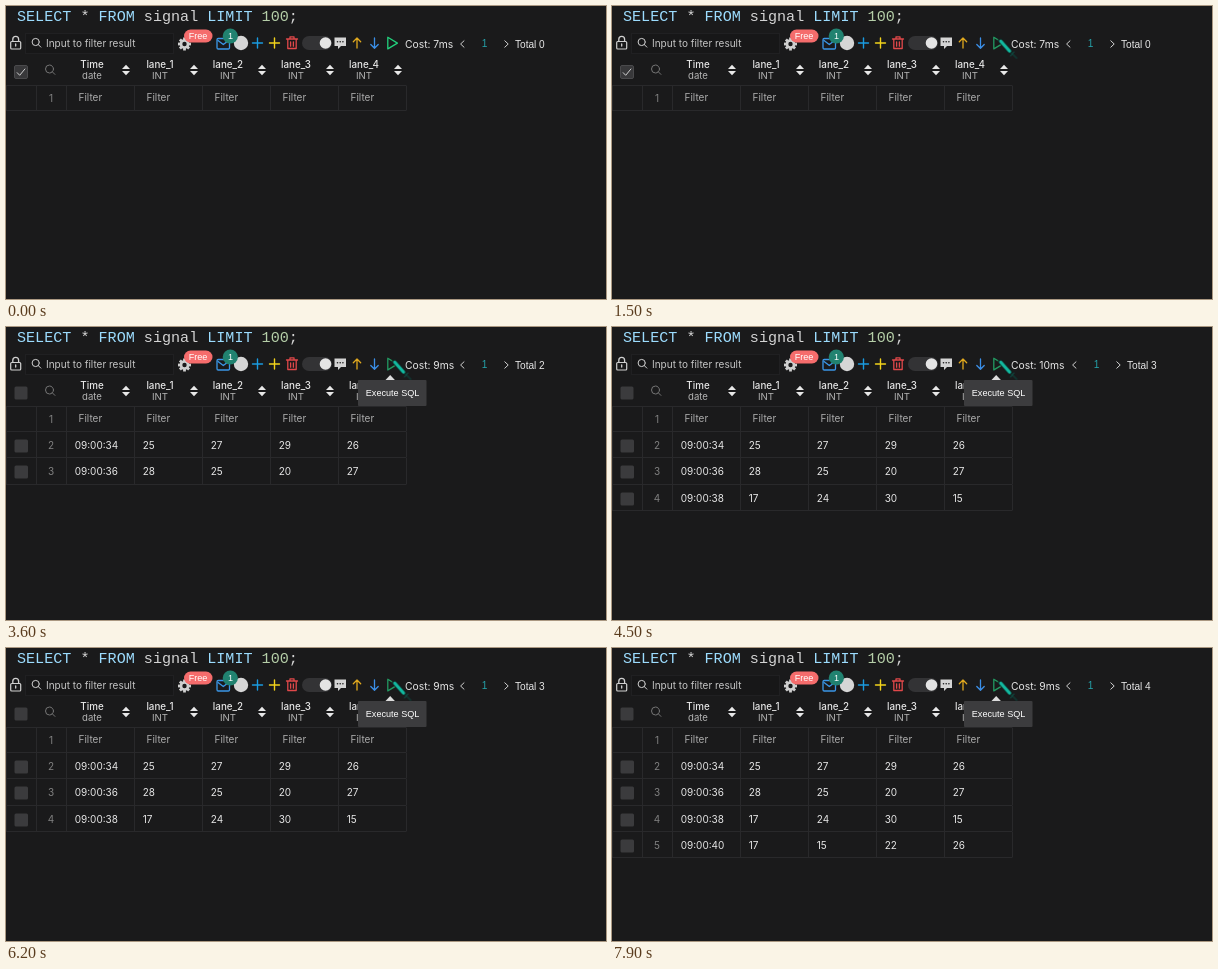
Animation, 600 px wide and 293 px high, one loop 8000 ms. Source, as an HTML page:

```html
<!DOCTYPE html>
<html lang="en">
<head>
<meta charset="utf-8">
<title>Query result</title>
<style>
html, body { margin: 0; width: 100%; height: 100%; overflow: hidden; background: #1a1a1b; }
svg { display: block; width: 100vw; height: 100vh; }
text { font: 10px Inter, "Open Sans", sans-serif; fill: #e6e6e6; white-space: pre; }
.sql { font: 15.1px "Liberation Mono", monospace; fill: #d4d4d4; }
.kw { fill: #9cdcfe; }
.num { fill: #b5cea8; }
.head { font-weight: 500; font-size: 9.8px; text-anchor: middle; }
.type { font-size: 9.6px; fill: #b4b4b4; text-anchor: middle; }
.dim { fill: #acacac; }
.hint { fill: #c6c6c6; }
.cost { font-size: 10.3px; }
.idx { fill: #808080; text-anchor: middle; }
.helv { font: 10.1px "Liberation Sans", Arial, sans-serif; }
.page { fill: #25a0a8; }
.tiny { font: 9.1px "Liberation Sans", Arial, sans-serif; fill: #fff; }
.line { fill: none; stroke-width: 1.3; stroke-linecap: round; stroke-linejoin: round; }
.thin { stroke-width: 1; }
.grid { fill: none; stroke: #29292b; stroke-width: 1; }
#pointer { animation: move 8s infinite; }
@keyframes move {
  0% { transform: translate(640px, 100px); animation-timing-function: step-end; }
  7.5% { transform: translate(584px, 80px); animation-timing-function: steps(2); }
  10% { transform: translate(474px, 43px); animation-timing-function: steps(2); }
  12.5% { transform: translate(411.5px, 24px); animation-timing-function: steps(4); }
  17.5%, 100% { transform: translate(386.5px, 31px); }
}
</style>
</head>
<body>
<svg id="stage" viewBox="0 0 600 293" preserveAspectRatio="none"></svg>
<script>
const LOOP = 8000;
const HOVER = 1400;
const TIP = 1600;
const RUNS = [0, 2500, 4100, 5800, 6800, LOOP];
const COLS = [128, 196, 264, 332];
const ROWS = [
  ['09:00:34', 25, 27, 29, 26],
  ['09:00:36', 28, 25, 20, 27],
  ['09:00:38', 17, 24, 30, 15],
  ['09:00:40', 17, 15, 22, 26]
];
const STATS = [['7ms', 0], ['9ms', 2], ['10ms', 3], ['9ms', 3], ['9ms', 4]];
let rules = '';
let count = 0;

const text = (x, y, s, cls = '') => `<text x="${x}" y="${y}" class="${cls}">${s}</text>`;
const path = (d, color, cls = '', width) =>
  `<path class="line ${cls}" d="${d}" stroke="${color}" ${width ? `style="stroke-width:${width}"` : ''}/>`;
const rect = (x, y, w, h, fill, more = '') =>
  `<rect x="${x}" y="${y}" width="${w}" height="${h}" fill="${fill}" ${more}/>`;
const dot = (x, y, r, fill) => `<circle cx="${x}" cy="${y}" r="${r}" fill="${fill}"/>`;

// Shows a group only between two times of the loop.
function during(from, to, body) {
  const name = 'show' + count++;
  const stop = (t, v) => `${t / LOOP * 100}% { visibility: ${v} }`;
  rules += `@keyframes ${name} { ${from ? stop(0, 'hidden') : ''} ${stop(from, 'visible')} ` +
    `${stop(to, to < LOOP ? 'hidden' : 'visible')} }`;
  return `<g style="animation: ${name} 8s step-end infinite">${body}</g>`;
}

const search = (x, y, r, color) =>
  path(`M${x + r} ${y}a${r} ${r} 0 1 0 ${-2 * r} 0a${r} ${r} 0 1 0 ${2 * r} 0` +
    `M${x + r * .7} ${y + r * .7}l2.6 2.6`, color, 'thin');

function editor() {
  return `<text x="11" y="15.3" class="sql"><tspan class="kw">SELECT</tspan> * <tspan class="kw">FROM</tspan>` +
    ` signal <tspan class="kw">LIMIT</tspan> <tspan class="num">100</tspan>;</text>`;
}

function gear(x, y) {
  let teeth = '';
  for (let a = 0; a < 360; a += 45)
    teeth += rect(x - 1.4, y - 6.5, 2.8, 3, '#cfcfcf', `transform="rotate(${a} ${x} ${y})"`);
  return teeth + `<circle cx="${x}" cy="${y}" r="3.5" fill="none" stroke="#cfcfcf" stroke-width="2.6"/>`;
}

function toolbar() {
  const plus = (x, c) => path(`M${x - 5} 37h10M${x} 32v10`, c, '', 1.4);
  const play = color => path('M381.8 31.3v11.6l9.6-5.8z', color);
  return rect(4.7, 35.5, 10, 7.5, 'none', 'rx="1" stroke="#d0d0d0" stroke-width="1.2"') +
    path('M6.8 35v-1.8a2.9 2.9 0 0 1 5.8 0V35M9.7 38v2', '#d0d0d0') +
    rect(19.5, 27.5, 148, 20, '#171718', 'stroke="#202022"') +
    search(29.7, 36, 3.6, '#d0d0d0') +
    text(40, 40.7, 'Input to filter result', 'hint') +
    gear(178.5, 38) +
    rect(178, 23.5, 28.5, 13, '#f56c6c', 'rx="6.5"') + text(182.7, 33.2, 'Free', 'tiny') +
    rect(211, 32.5, 12.5, 10.5, 'none', 'rx="1.2" stroke="#3b97e8" stroke-width="1.3"') +
    path('M212 34.5l5.3 4l5.3-4', '#3b97e8') +
    dot(235, 37, 7.2, '#d6d6d6') +
    dot(224.3, 30, 7.6, '#218270') + text(222, 33.2, '1', 'tiny') +
    plus(251.5, '#1a9be0') + plus(268.5, '#f2d31b') +
    path('M280.5 33h11M284 32.5v-1.7h4v1.7M281.8 33v9.5h8.4V33M284.6 35.8v4.4M287.4 35.8v4.4', '#e0484a') +
    rect(296, 30, 30, 14, '#333335', 'rx="7"') + dot(319.5, 37, 5.8, '#e4e4e4') +
    '<path d="M328.5 31.5h11.5v8.5h-5l-3 3v-3h-3.5z" fill="#d4d4d4"/>' +
    [331.5, 334.2, 336.9].map(x => dot(x, 35.7, .8, '#1a1a1b')).join('') +
    path('M351 42V32M347.3 35.7L351 32l3.7 3.7', '#e0a81e') +
    path('M368.5 32v10M364.8 38.5l3.7 3.7l3.7-3.7', '#3b8fe8') +
    during(0, HOVER, play('#22d07c')) + during(HOVER, LOOP, play('#239a62'));
}

function stats([cost, total], i) {
  const dx = cost.length > 3 ? 6 : 0;
  return during(RUNS[i], RUNS[i + 1],
    text(399, 41.6, 'Cost: ' + cost, 'cost') +
    `<g transform="translate(${dx} 0)">` +
    path('M458 34.8l-3.4 3.2l3.4 3.2M498.8 34.8l3.4 3.2l-3.4 3.2', '#d0d0d0', 'thin') +
    text(475.7, 41.4, '1', 'helv page') +
    text(509, 41.5, 'Total ' + total, 'helv') + '</g>');
}

function header() {
  const names = ['Time', 'lane_1', 'lane_2', 'lane_3', 'lane_4'];
  return during(0, RUNS[1],
      rect(8.5, 59.5, 13, 13, '#38383a', 'rx="1.5" stroke="#4a4a4c"') +
      path('M11.2 66.7l2.5 2.6l5.2-6.3', '#cfcfcf', 'thin')) +
    during(RUNS[1], LOOP, rect(8.5, 59.5, 13, 13, '#3b3b3d', 'rx="1.5"')) +
    search(43.5, 63, 4, '#757575') +
    names.map((n, i) => {
      const x = 86 + 68 * i;
      return text(x, 61.7, n, 'head') + text(x, 73.4, i ? 'INT' : 'date', 'type') +
        `<path d="M${x + 30} 63l4-4.3l4 4.3zM${x + 30} 65l4 4.3l4-4.3z" fill="#e8e8e8"/>`;
    }).join('');
}

// Bottom and upright borders of one table row.
function cells(top, bottom) {
  return `<path class="grid" d="M0 ${bottom + .5}H400.5` +
    [0, 30, 60, ...COLS, 400].map(x => `M${x + .5} ${top}V${bottom}`).join('') + '"/>';
}

function filters() {
  return '<path class="grid" d="M0 79.5H400.5"/>' + cells(80, 104) + text(45, 95.5, 1, 'idx') +
    [60, ...COLS].map(x => text(x + 12.5, 95.3, 'Filter', 'dim')).join('');
}

function row(values, i) {
  const y = 104 + 26.3 * i;
  const mid = Math.round(y + 14);
  const from = RUNS[[1, 1, 2, 4][i]];
  return during(from, LOOP,
    cells(Math.round(y) + 1, Math.round(y + 26.3)) +
    rect(8.5, mid - 5.5, 13.5, 13, '#3b3b3d', 'rx="1.5"') +
    text(45, mid + 3.5, i + 2, 'idx') +
    values.map((v, c) => text(68.7 + 68 * c, mid + 3.5, v)).join(''));
}

const tooltip = () => during(TIP, LOOP,
  rect(352, 53, 68.5, 26, '#3c3c3e', 'rx="1"') +
  '<path d="M379.5 53l4.7-5l4.7 5z" fill="#dcdcdc"/>' +
  text(359.8, 69, 'Execute SQL', 'tiny'));

const pointer = () => '<g id="pointer">' +
  path('M10 13L18 21', '#12342f', '', 1.8) +
  path('M2 3.5L11 14', '#14211f', '', 5) +
  path('M2.3 4.2L11 14', '#12b89f', '', 3.2) +
  path('M15.5 15l-3.5 4', '#0f4f47', '', 1.1) + '</g>';

document.getElementById('stage').innerHTML = editor() + toolbar() +
  STATS.map(stats).join('') + header() + filters() + ROWS.map(row).join('') + tooltip() + pointer();
const sheet = document.createElement('style');
sheet.textContent = rules;
document.head.append(sheet);
</script>
</body>
</html>
```
